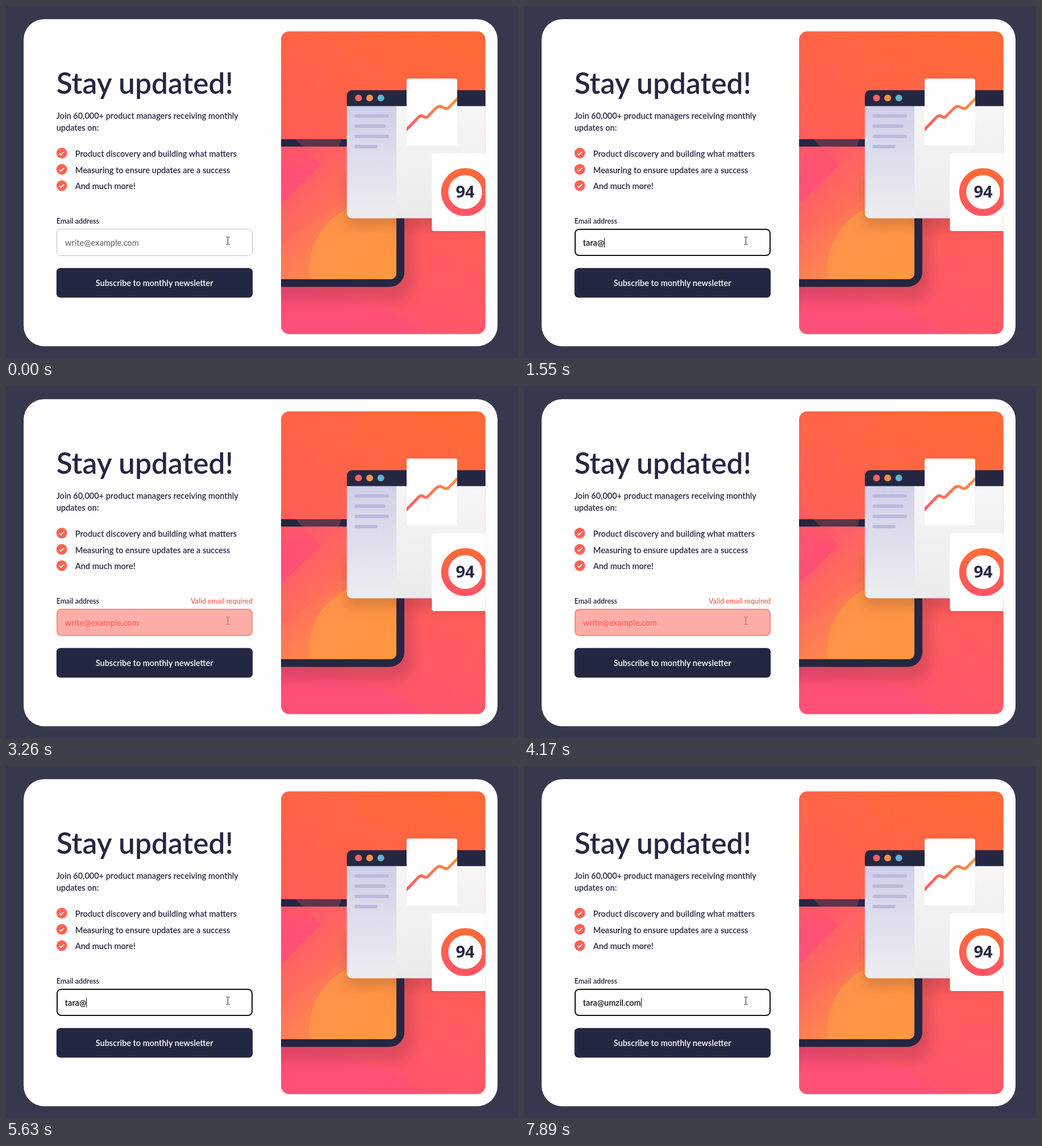
An HTML page for the animation above (8 s loop, 901 by 621 pixels).

```html
<!DOCTYPE html>
<html lang="en">
<head>
<meta charset="utf-8">
<title>Newsletter sign-up</title>
<style>
html, body { margin: 0; width: 100%; height: 100%; overflow: hidden; background: #36384d; }
svg { display: block; width: 901px; height: 621px; }
text { font: 600 14.5px Lato, sans-serif; fill: #242742; white-space: pre; }
.title { font-size: 51.5px; }
.label { font-size: 12.5px; }
.score { font: 700 29px "Open Sans", "Noto Sans", sans-serif; }
.soft { filter: blur(11px); }
#field { fill: #fff; stroke: #bdbdbd; }
#field.focus { stroke: #111; stroke-width: 2px; }
#field.error { fill: #ffada9; stroke: #ff8781; stroke-width: 2px; }
</style>
</head>
<body>
<svg viewBox="0 0 901 621">
  <defs>
    <linearGradient id="back" gradientUnits="userSpaceOnUse" x1="800" y1="60" x2="590" y2="560">
      <stop stop-color="#ff6a36"/><stop offset=".42" stop-color="#ff6051"/>
      <stop offset=".75" stop-color="#ff5a62"/><stop offset="1" stop-color="#ff5272"/>
    </linearGradient>
    <linearGradient id="screen" gradientUnits="userSpaceOnUse" x1="490" y1="290" x2="620" y2="420">
      <stop stop-color="#ff5276"/><stop offset=".45" stop-color="#ff6e5e"/><stop offset="1" stop-color="#ff8e48"/>
    </linearGradient>
    <linearGradient id="disc" x2=".8" y2=".5">
      <stop stop-color="#ff914c"/><stop offset="1" stop-color="#ff973e"/>
    </linearGradient>
    <linearGradient id="wedge" gradientUnits="userSpaceOnUse" x1="520" y1="212" x2="500" y2="340">
      <stop stop-color="#ff6056"/><stop offset=".5" stop-color="#ff5272"/><stop offset="1" stop-color="#ff5078"/>
    </linearGradient>
    <linearGradient id="side" x2="0" y2="1">
      <stop stop-color="#cfcfe9"/><stop offset="1" stop-color="#eeeef0"/>
    </linearGradient>
    <linearGradient id="main" x2="0" y2="1">
      <stop stop-color="#f6f6f6"/><stop offset="1" stop-color="#ebebeb"/>
    </linearGradient>
    <linearGradient id="line"><stop stop-color="#ff5a62"/><stop offset="1" stop-color="#ff9142"/></linearGradient>
    <linearGradient id="ring" x2="0" y2="1"><stop stop-color="#ff6a3a"/><stop offset="1" stop-color="#ff5563"/></linearGradient>
    <clipPath id="art"><rect x="484" y="44.7" width="359.7" height="534" rx="14.4"/></clipPath>
    <clipPath id="glass"><rect x="460" y="248" width="227" height="234" rx="10"/></clipPath>
    <clipPath id="window"><rect x="599.8" y="148.6" width="270" height="226" rx="9"/></clipPath>
    <clipPath id="paper"><rect x="705" y="128" width="89" height="118" rx="4"/></clipPath>
  </defs>

  <rect x="31" y="23.3" width="834" height="577" rx="36" fill="#fff"/>

  <g clip-path="url(#art)">
    <rect x="484" y="44" width="360" height="535" fill="url(#back)"/>
    <path d="M484 44H640L484 190Z" fill="#ff5a5c" opacity=".12"/>
    <path d="M484 490L655 530 740 579H484Z" fill="#ff4f7c" opacity=".5"/>

    <rect class="soft" x="440" y="290" width="275" height="229" rx="28" fill="#7a2440" opacity=".26"/>
    <rect x="440" y="235" width="261" height="260.5" rx="26" fill="#242742"/>
    <g clip-path="url(#glass)">
      <rect x="460" y="248" width="227" height="234" fill="url(#screen)"/>
      <path d="M522 248H687V340H600L484 420V350L555 280Z" fill="#ff6659" opacity=".35"/>
      <path d="M484 248H522L555 280 484 350Z" fill="url(#wedge)"/>
      <circle cx="652" cy="464" r="118" fill="url(#disc)"/>
      <rect class="soft" x="598" y="300" width="150" height="88" fill="#7a3a20" opacity=".26"/>
    </g>
    <path d="M484 210L509 235H484Z" fill="#ff5a62" opacity=".6"/>
    <path d="M509 235H590L586 248H522Z" fill="#ff6257" opacity=".25"/>

    <rect class="soft" x="702" y="300" width="160" height="93" fill="#7a2440" opacity=".25"/>
    <g clip-path="url(#window)">
      <rect x="599" y="176" width="88" height="199" fill="url(#side)"/>
      <rect x="687" y="176" width="183" height="199" fill="url(#main)"/>
      <rect x="599" y="148" width="271" height="28.6" fill="#242742"/>
    </g>
    <circle cx="620.3" cy="162.3" r="6" fill="#ff6063"/>
    <circle cx="640" cy="162.3" r="6" fill="#ff9145"/>
    <circle cx="659.6" cy="162.3" r="6" fill="#62b3d0"/>
    <path d="M616 194h55M616 212h49M616 230h55M616 248h35" stroke="#b9b9db" stroke-width="6" stroke-linecap="round"/>

    <rect x="705" y="128" width="89" height="118" rx="4" fill="#fff"/>
    <path clip-path="url(#paper)" d="M702 221L724 198Q730 191 735 195T745 192L755 182Q762 174 769 179T781 177L797 161"
      fill="none" stroke="url(#line)" stroke-width="5"/>

    <rect x="749.5" y="260" width="110" height="137" rx="4" fill="#fff"/>
    <circle cx="808" cy="328.3" r="36" fill="none" stroke="url(#ring)" stroke-width="12.6"/>
    <text class="score" x="808" y="338" text-anchor="middle">94</text>
  </g>

  <text class="title" x="88.7" y="155">Stay updated!</text>
  <text x="88.7" y="199">Join 60,000+ product managers receiving monthly</text>
  <text x="88.7" y="220">updates on:</text>
  <g id="list"></g>

  <text class="label" x="88.7" y="383.5">Email address</text>
  <text class="label" id="warning" x="434" y="383.5" text-anchor="end" style="fill:#ff6257">Valid email required</text>
  <rect id="field"/>
  <text id="value" x="103.8" y="423"></text>
  <rect id="caret" y="409" width="1" height="17"/>
  <path id="pointer" d="M387.5 407.5h2.5m1 0h2.5M390.5 408v12M387.5 420.5h2.5m1 0h2.5" fill="none"/>

  <rect x="88.8" y="462.2" width="345.3" height="52.3" rx="7" fill="#242742"/>
  <text x="261.2" y="494" text-anchor="middle" style="fill:#fff">Subscribe to monthly newsletter</text>
</svg>
<script>
const $ = id => document.getElementById(id);
const address = 'tara@umzil.com', hint = 'write@example.com';

$('list').innerHTML = [
  'Product discovery and building what matters',
  'Measuring to ensure updates are a success',
  'And much more!'
].map((line, i) => `<g transform="translate(88.7 ${250 + i * 28.7}) scale(.9)">
  <circle cx="10.5" cy="10.5" r="10.5" fill="#ff6257"/>
  <path d="M6 11.4L8.7 14 15 8" fill="none" stroke="#fff" stroke-width="2"/></g>
  <text x="121.8" y="${Math.round(266 + i * 28.7)}">${line}</text>`).join('');

// [start in ms, field state, letters typed, caret shown]
const steps = [
  [0, '', 0, 0], [50, 'focus', 0, 1], [320, 'focus', 1, 1], [420, 'focus', 2, 1],
  [930, 'focus', 3, 1], [1030, 'focus', 4, 1], [1550, 'focus', 5, 1],
  [2040, 'focus', 5, 0], [2600, 'focus', 5, 1], [3110, 'focus', 5, 0],
  [3260, 'error', 0, 0], [3610, 'error', 0, 1], [4170, 'error', 0, 0],
  [4570, 'focus', 1, 1], [4670, 'focus', 2, 1], [4870, 'focus', 3, 1], [5020, 'focus', 4, 1],
  [5530, 'focus', 4, 0], [5630, 'focus', 5, 1], [6120, 'focus', 5, 0],
  [6170, 'focus', 6, 1], [6630, 'focus', 7, 1], [6780, 'focus', 8, 1], [6830, 'focus', 9, 1],
  [7030, 'focus', 10, 1], [7390, 'focus', 11, 1],
  [7690, 'focus', 12, 1], [7790, 'focus', 13, 1], [7890, 'focus', 14, 1]
];

function setAttrs(el, attrs) {
  for (const name in attrs) el.setAttribute(name, attrs[name]);
}

function draw(now) {
  const time = now % 8000;
  const [, state, typed, caretOn] = steps.findLast(step => step[0] <= time);
  const error = state === 'error', value = $('value');
  const inset = state ? 1 : .5;

  setAttrs($('field'), {
    class: state, x: 89 + inset, y: 393 + inset,
    width: 345 - 2 * inset, height: 48 - 2 * inset, rx: 7
  });
  value.textContent = typed ? address.slice(0, typed) : hint;
  value.style.fill = error ? '#ff6257' : typed ? '#111' : '#757575';
  setAttrs($('caret'), {
    x: Math.round(103.8 + (typed ? value.getComputedTextLength() : 0)),
    fill: error ? '#ff6257' : '#111',
    opacity: caretOn
  });
  $('pointer').setAttribute('stroke', error ? '#b5625f' : '#222');
  $('warning').setAttribute('opacity', error ? 1 : 0);
  requestAnimationFrame(draw);
}
requestAnimationFrame(draw);
</script>
</body>
</html>
```
